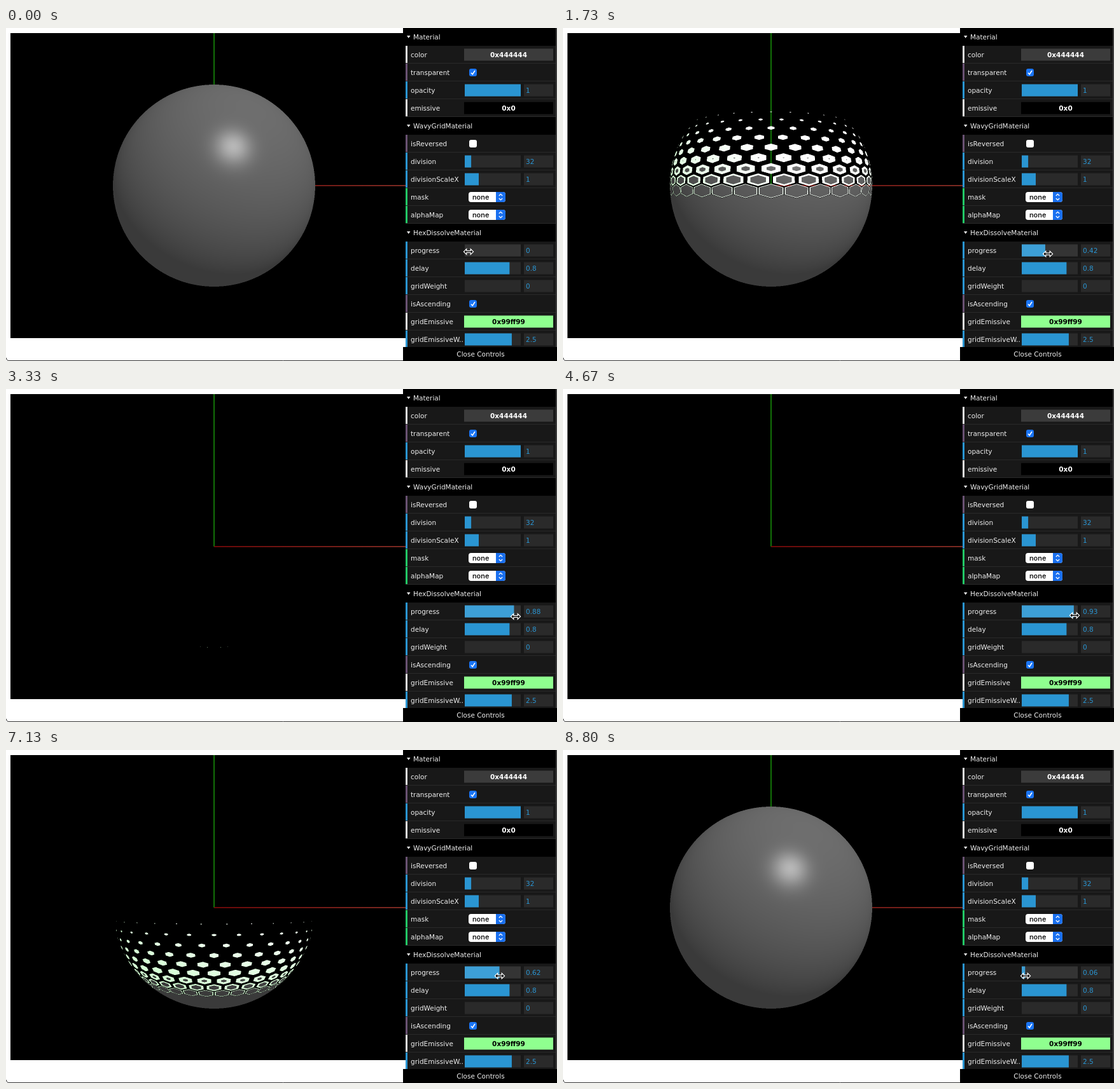
An HTML page with a canvas that plays this animation: 866 by 524 pixels, repeating every 8870 ms.

```html
<!DOCTYPE html>
<html lang="en">
<head>
<meta charset="utf-8">
<title>Hex dissolve</title>
<style>
  html, body { margin: 0; width: 100%; height: 100%; overflow: hidden; background: #fff; }
  canvas { display: block; }
</style>
</head>
<body>
<canvas id="stage" width="866" height="524"></canvas>
<script>
const ctx = document.getElementById('stage').getContext('2d');
const LOOP = 8870;
const FONT = '10.5px "DejaVu Sans", sans-serif';
const BLUE = '#2a95d2', WELL = '#2a2a2a';

// time, progress, pointer x, pointer y
const KEYS = [
  [0, 0, 727, 352], [200, 0, 727, 353], [201, 0.06, 727, 353], [500, 0.07, 729, 354],
  [930, 0.14, 735, 355], [1730, 0.42, 762, 355.5], [2300, 0.61, 778, 356.5],
  [2870, 0.8, 794, 357.5], [3330, 0.88, 801, 358], [3800, 0.905, 803, 357.5],
  [4300, 0.93, 804, 356.5], [6070, 0.93, 804, 355.5], [6530, 0.84, 796, 355.5],
  [7130, 0.62, 776, 355.5], [7600, 0.4, 755, 355.5], [8400, 0.12, 732, 355.5],
  [8800, 0.06, 727, 355.5], [LOOP, 0.05, 727, 354]
];

function pose(t) {
  const i = KEYS.findIndex(k => k[0] > t);
  const a = KEYS[i - 1], b = KEYS[i], s = (t - a[0]) / (b[0] - a[0]);
  return a.map((v, n) => v + (b[n] - v) * s);
}

function rect(x, y, w, h, color) {
  ctx.fillStyle = color;
  ctx.fillRect(x, y, w, h);
}

function pill(x, y, w, h, radii, color) {
  ctx.fillStyle = color;
  ctx.beginPath();
  ctx.roundRect(x, y, w, h, radii);
  ctx.fill();
}

function text(str, x, y, color = '#eee', font = FONT, align = 'left') {
  ctx.font = font;
  ctx.fillStyle = color;
  ctx.textAlign = align;
  ctx.fillText(str, x, y);
}

function poly(points, close) {
  ctx.beginPath();
  points.forEach(([x, y]) => ctx.lineTo(x, y));
  if (close) ctx.closePath();
}

// ---- sphere, sampled twice per pixel in each direction ----
const CX = 327, CY = 248, BOX = 320, SIZE = BOX * 2;
const FOCAL = 579.4, DIST = 3.78, DIVISION = 32, ROW = Math.sqrt(3) / 2, DELAY = 0.8;
const LIGHT = [0.315, 0.641, 0.7];
const layer = document.createElement('canvas');
layer.width = layer.height = SIZE;
const layerCtx = layer.getContext('2d');
const image = layerCtx.createImageData(SIZE, SIZE);
const shade = new Float32Array(SIZE * SIZE);    // 0 outside the sphere
const edge = new Float32Array(SIZE * SIZE);     // 0 at a cell's centre, 1 at its border
const begin = new Float32Array(SIZE * SIZE);    // progress at which the cell starts to shrink

const dot = (a, b) => a[0] * b[0] + a[1] * b[1] + a[2] * b[2];
const unit = a => { const l = Math.hypot(...a); return a.map(v => v / l); };

function lighting(n) {
  const view = unit([-n[0], -n[1], DIST - n[2]]);
  const half = unit(view.map((v, i) => v + LIGHT[i]));
  const lit = Math.max(0, dot(n, LIGHT));
  return 58 + 52 * lit + 78 * Math.max(0, dot(n, half)) ** 70;
}

function hexCell(u, v) {
  let best = { dist: 9 };
  const near = Math.round(v / ROW);
  for (let j = near - 1; j <= near + 1; j++) {
    const shift = j & 1 ? 0.5 : 0;
    const x = Math.abs(u - shift - Math.round(u - shift));
    const y = Math.abs(v - j * ROW);
    const dist = Math.hypot(x, y);
    if (dist < best.dist) best = { dist, j, edge: 2 * Math.max(x, x / 2 + y * ROW) };
  }
  return best;
}

for (let row = 0, k = 0; row < SIZE; row++) {
  for (let col = 0; col < SIZE; col++, k++) {
    const dx = ((col + 0.5) / 2 - BOX / 2) / FOCAL;
    const dy = (BOX / 2 - (row + 0.5) / 2) / FOCAL;
    const a = 1 + dx * dx + dy * dy;
    const disc = DIST * DIST - a * (DIST * DIST - 1);
    if (disc < 0) continue;
    const t = (DIST - Math.sqrt(disc)) / a;
    const n = [t * dx, t * dy, DIST - t];
    const cell = hexCell(Math.atan2(n[0], n[2]) / (2 * Math.PI) * DIVISION,
                         (Math.asin(n[1]) / Math.PI + 0.5) * DIVISION);
    shade[k] = lighting(n);
    edge[k] = cell.edge;
    begin[k] = (1 - cell.j * ROW / DIVISION) * DELAY;
  }
}

let drawnProgress = -1;
function renderSphere(progress) {
  if (progress === drawnProgress) return;
  drawnProgress = progress;
  const data = image.data;
  for (let k = 0, o = 0; k < shade.length; k++, o += 4) {
    const local = Math.max(0, (progress - begin[k]) / (1 - DELAY));
    const visible = shade[k] > 0 && (local === 0 || edge[k] < 1 - local);
    data[o + 3] = visible ? 255 : 0;
    if (!visible) continue;
    const glow = local > 0 && edge[k] > 1 - 2.5 * local;
    data[o] = data[o + 2] = shade[k] + (glow ? 153 : 0);
    data[o + 1] = shade[k] + (glow ? 255 : 0);
  }
  layerCtx.putImageData(image, 0, 0);
}

function drawScene(progress) {
  rect(0, 0, 866, 524, '#fff');
  rect(7, 8, 640, 480, '#000');
  rect(326, 8, 2, 240, '#127008');
  const red = ctx.createLinearGradient(CX, 0, 628, 0);
  red.addColorStop(0, '#6a0808');
  red.addColorStop(1, '#7a2a22');
  rect(CX, 247, 301, 2, red);
  renderSphere(progress);
  ctx.drawImage(layer, CX - BOX / 2, CY - BOX / 2, BOX, BOX);
  rect(647, 0, 219, 524, '#fff');
  // window's lower border
  ctx.strokeStyle = '#333';
  ctx.lineWidth = 1;
  ctx.beginPath();
  ctx.moveTo(0.5, 519);
  ctx.quadraticCurveTo(0.5, 523.5, 5, 523.5);
  ctx.lineTo(866, 523.5);
  ctx.stroke();
}

// ---- control panel ----
const ACCENT = { color: '#ddd', check: '#6a5273', slider: BLUE, select: '#22c865' };
const ROWS = [
  ['title', 'Material'],
  ['color', 'color', '0x444444', '#3b3b3b', '#fff'],
  ['check', 'transparent', true],
  ['slider', 'opacity', '1', 1],
  ['color', 'emissive', '0x0', '#000', '#fff'],
  ['title', 'WavyGridMaterial'],
  ['check', 'isReversed', false],
  ['slider', 'division', '32', 0.115],
  ['slider', 'divisionScaleX', '1', 0.25],
  ['select', 'mask'],
  ['select', 'alphaMap'],
  ['title', 'HexDissolveMaterial'],
  ['slider', 'progress'],
  ['slider', 'delay', '0.8', 0.8],
  ['slider', 'gridWeight', '0', 0],
  ['check', 'isAscending', true],
  ['color', 'gridEmissive', '0x99ff99', '#8fff8f', '#000'],
  ['slider', 'gridEmissiveW..', '2.5', 0.84]
];

const widgets = {
  color(y, label, fill, ink) {
    rect(720, y - 9.5, 140, 19, fill);
    text(label, 790, y + 4, ink, 'bold ' + FONT, 'center');
  },
  check(y, on) {
    pill(728, y - 6, 12, 12, 3, on ? '#1a75f5' : '#fff');
    if (!on) return;
    ctx.strokeStyle = '#fff';
    ctx.lineWidth = 1.6;
    poly([[731, y + 0.5], [733.2, y + 3], [737, y - 3]]);
    ctx.stroke();
  },
  slider(y, value, part, hover) {
    rect(721, y - 9.5, 88, 19, hover ? '#343434' : WELL);
    rect(721, y - 9.5, 88 * part, 19, hover ? '#3d9fd6' : BLUE);
    rect(814, y - 9.5, 46, 19, WELL);
    text(value, 817, y + 4, BLUE);
  },
  select(y) {
    pill(727, y - 8, 58, 16, 4, '#fff');
    pill(770, y - 8, 15, 16, [0, 4, 4, 0], '#1a70f0');
    text('none', 733, y + 4, '#000', '500 11px Inter, sans-serif');
    ctx.strokeStyle = '#fff';
    ctx.lineWidth = 1.3;
    for (const s of [-1, 1]) {
      poly([[774.8, y + 2 * s], [777.5, y + 4.6 * s], [780.2, y + 2 * s]]);
      ctx.stroke();
    }
  }
};

function drawPanel(progress) {
  ROWS.forEach(([kind, label, ...args], i) => {
    const y = 14 + 28 * i;
    if (kind === 'title') {
      rect(624, y - 14, 240, 28, '#000');
      ctx.fillStyle = '#eee';
      poly([[630, y - 2], [635.5, y - 2], [632.7, y + 2]], true);
      ctx.fill();
      text(label, 640, y + 4);
      return;
    }
    rect(628, y - 14, 236, 28, '#181818');
    rect(628, y + 13, 236, 1, '#292929');
    rect(628, y - 14, 3, 27, ACCENT[kind]);
    text(label, 636, y + 4);
    if (label === 'progress') args = [String(progress), progress, true];
    widgets[kind](y, ...args);
  });
  rect(864, 0, 2, 524, '#3c3c3c');
  rect(624, 502, 242, 22, '#000');
  text('Close Controls', 746, 517, '#eee', FONT, 'center');
}

function drawPointer(x, y) {
  const side = [[-3.2, -1.4], [-3.2, -4.4], [-7.6, 0], [-3.2, 4.4], [-3.2, 1.4]];
  const mirrored = side.map(([a, b]) => [-a, -b]);
  poly([...side, ...mirrored].map(([a, b]) => [x + a, y + b]), true);
  ctx.fillStyle = '#000';
  ctx.fill();
  ctx.strokeStyle = '#fff';
  ctx.lineWidth = 1.2;
  ctx.stroke();
}

function frame() {
  const [, raw, x, y] = pose(performance.now() % LOOP);
  const progress = Math.round(raw * 100) / 100;
  drawScene(progress);
  drawPanel(progress);
  drawPointer(x, y);
  requestAnimationFrame(frame);
}
frame();
</script>
</body>
</html>
```
